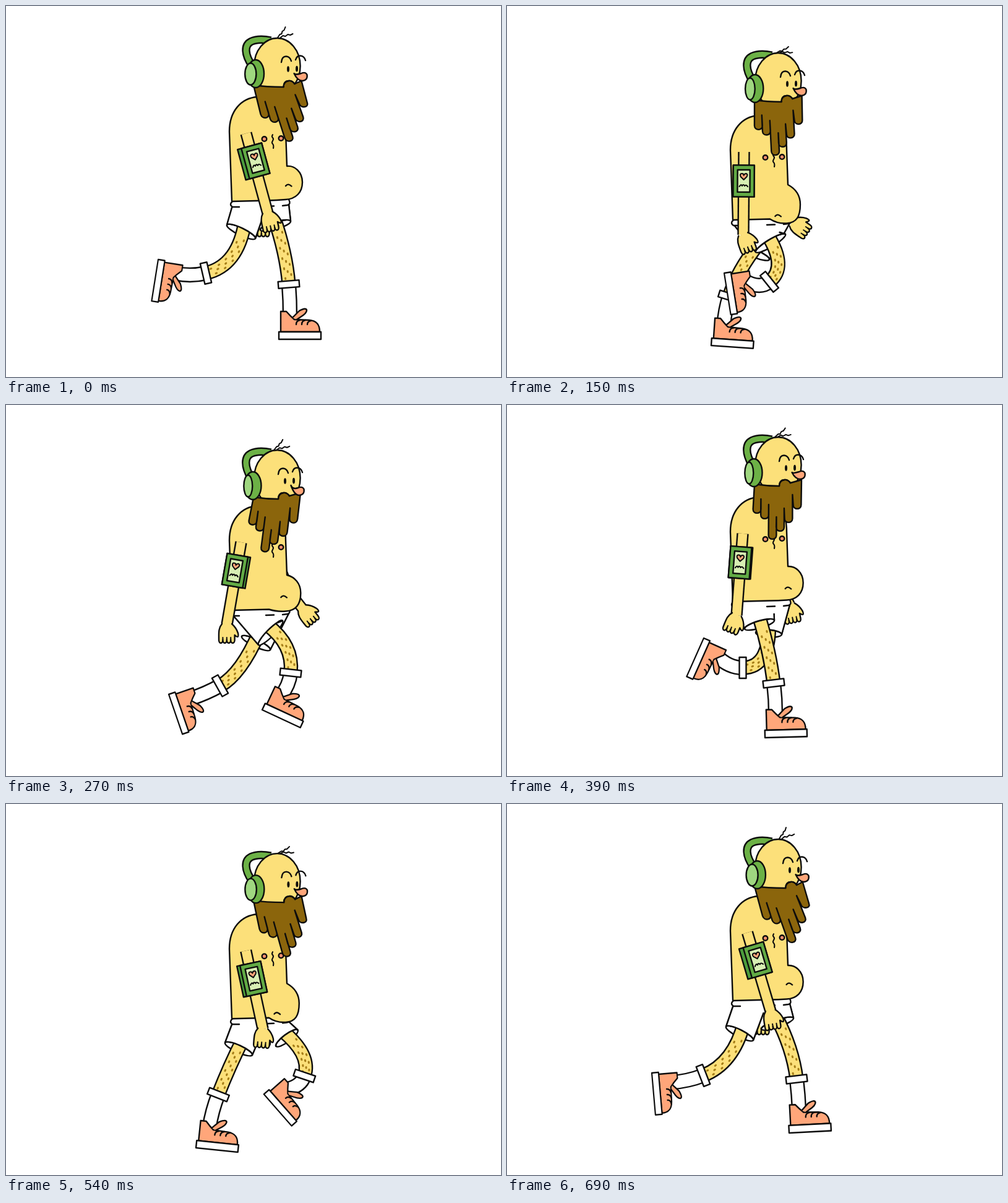
Write an HTML page with a canvas that moves like this. It is 800 px wide and 600 px high and loops after 720 ms.

```html
<!DOCTYPE html>
<html>
<head>
<meta charset="utf-8">
<title>Jogger</title>
<style>
  html, body { margin: 0; width: 100%; height: 100%; overflow: hidden; background: #fff; }
  canvas { display: block; }
</style>
</head>
<body>
<canvas id="stage" width="800" height="600"></canvas>
<script>
const ctx = document.getElementById('stage').getContext('2d');
const LOOP = 720, STEP = 30, LINE = 2.4, RAD = Math.PI / 180;
const INK = '#0c0c0c', SKIN = '#fce07a', HAIR = '#8b650c', FLESH = '#ffa67a', SPECK = '#a67e18',
      GREEN = '#6cb146', DARK = '#4c9c3c', LIGHT = '#9fd780', SCREEN = '#d8efb4';

// Rows: time, then the pose values at that time
// Legs: knee x y, cuff x y, heel x y, shoe angle, hem back x y, hem front x y
const NEAR_LEG = [
  [0, 375, 420, 323, 432, 246, 410, 99, 357, 354, 403, 376],
  [60, 390, 425, 346, 425, 282, 379, 113, 370, 362, 418, 372],
  [150, 454, 422, 424, 446, 351, 432, 81, 402, 398, 450, 369],
  [270, 465, 388, 460, 433, 414, 493, 25, 408, 388, 447, 349],
  [330, 449, 395, 452, 443, 440, 526, 3, 394, 370, 443, 343],
  [390, 425, 400, 431, 450, 417, 538, -1.5, 384, 362, 432, 348],
  [480, 381, 425, 374, 475, 350, 557, 2, 362, 385, 411, 393],
  [540, 361, 424, 343, 470, 307, 556, 6, 354, 386, 398, 406],
  [600, 342, 424, 316, 461, 263, 521, 24, 347, 380, 385, 411],
  [690, 366, 420, 317, 439, 234, 435, 85, 354, 360, 398, 382]
];
const FAR_LEG = [
  [0, 453, 400, 457, 450, 441, 539, 0, 411, 362, 460, 348],
  [150, 372, 428, 359, 470, 330, 549, 4, 380, 392, 424, 410],
  [210, 355, 422, 331, 466, 284, 542, 14, 378, 386, 422, 408],
  [270, 380, 435, 346, 454, 263, 468, 71, 381, 374, 427, 396],
  [390, 425, 425, 381, 425, 318, 377, 114, 402, 368, 444, 371],
  [480, 482, 418, 457, 437, 383, 430, 77, 426, 395, 467, 371],
  [600, 489, 395, 488, 441, 444, 504, 22, 436, 380, 471, 357],
  [645, 478, 393, 480, 443, 461, 521, 6, 424, 372, 470, 350],
  [690, 462, 395, 468, 445, 456, 532, -3, 411, 364, 463, 346]
];
// Shoulder x, wrist x y, hand angle
const NEAR_ARM = [
  [0, 388, 423, 335, -12], [150, 383, 382, 370, -20], [270, 380, 357, 355, 0], [390, 381, 371, 340, 22],
  [480, 385.5, 397, 362, 12], [600, 389, 428, 358, -2], [690, 388.5, 426, 335, -9]
];
// Wrist x y, hand angle
const FAR_ARM = [
  [0, 413, 343, 0], [150, 462, 350, -55], [270, 479, 329, -38], [390, 457, 323, -12],
  [480, 428, 352, 0], [600, 408, 362, 0], [690, 411, 343, 0]
];
// Turn of the face, beard swing, hair angle, nose drop
const HEAD = [
  [0, 5, 30, 0, 0], [150, 2, 5, 27, 0], [270, 0, -11, 4, 4], [390, 0, 0, 13, -1],
  [480, 3, 15, 28, -2], [600, 7, 34, 13, 2], [690, 6, 33, -5, 0]
];
// Once per step: torso drop, top of head, navel drop
const BOB = [
  [0, 0, 52, 0], [30, 2, 52, 4], [120, 24, 69, 18], [150, 30, 76, 19],
  [240, 23, 79, 9], [270, 16, 73, 4], [330, 2, 57, -1]
];

// Smooth cyclic interpolation through the rows
function sample(rows, time, period) {
  const n = rows.length, t = time % period;
  const time0 = i => rows[(i + n) % n][0] + period * Math.floor(i / n);
  let i = n - 1;
  while (rows[i][0] > t) i--;
  const [a, b, c, d] = [i - 1, i, i + 1, i + 2].map(time0);
  const h = c - b, u = (t - b) / h;
  return rows[i].slice(1).map((_, j) => {
    const [p, q, r, s] = [-1, 0, 1, 2].map(k => rows[(i + k + n) % n][j + 1]);
    const s0 = (q - p) / (b - a), s1 = (r - q) / h, s2 = (s - r) / (d - c);
    const m0 = (s0 * h + s1 * (b - a)) / (c - a), m1 = (s1 * (d - c) + s2 * h) / (d - b);
    return q + u * (h * m0 + u * (3 * (r - q) - h * (2 * m0 + m1) + u * (2 * (q - r) + h * (m0 + m1))));
  });
}

function draw(path, fill, line = LINE) {
  const p = new Path2D(path);
  if (fill) { ctx.fillStyle = fill; ctx.fill(p); }
  if (line) { ctx.lineWidth = line; ctx.strokeStyle = INK; ctx.stroke(p); }
}

function oval(x, y, rx, ry, fill, line = LINE, angle = 0) {
  ctx.beginPath();
  ctx.ellipse(x, y, rx, ry, angle, 0, 7);
  ctx.fillStyle = fill;
  ctx.fill();
  if (line) { ctx.lineWidth = line; ctx.strokeStyle = INK; ctx.stroke(); }
}

function tube(path, width, fill) {
  const p = new Path2D(path);
  ctx.lineCap = 'butt';
  for (const [w, color] of [[width + LINE, INK], [width - LINE, fill]]) {
    ctx.lineWidth = w;
    ctx.strokeStyle = color;
    ctx.stroke(p);
  }
  ctx.lineCap = 'round';
}

function at(x, y, degrees, paint) {
  ctx.save();
  ctx.translate(x, y);
  ctx.rotate(degrees * RAD);
  paint();
  ctx.restore();
}

function shoe() {
  draw('M3 -12V-45H12Q19 -37 25 -32L49 -31C61 -30 66 -24 66 -12Z', FLESH);
  draw('M22 -35L33 -46Q44 -52 45 -47Q45 -42 35 -36L29 -32', FLESH);
  draw('M34 -31Q28 -30 28 -24M43 -31Q37 -30 37 -24M52 -30Q46 -29 46 -24');
  draw('M0 -12H68V0H0Z', '#fff');
}

function hand() {
  const finger = 'a3.2 5 0 0 0 6.4 0';
  draw('M-8 -1C-14 6 -13 14 -13 25' + finger + finger + finger + finger +
       'V17Q20 24 18 14Q15 5 8 -1', SKIN);
  draw('M-6.6 25v-4M-.2 25v-4M6.2 25v-4', null, 2);
}

function leg(pose, hipX, drop, near) {
  const [kx, ky, cx, cy, px, py, angle, lx, ly, rx, ry] = pose;
  const mx = (lx + rx) / 2, my = (ly + ry) / 2, half = Math.hypot(rx - lx, ry - ly) / 2;
  const tilt = Math.atan2(ry - ly, rx - lx);
  const hx = mx + (hipX - mx) * .25, hy = my + (300 + drop - my) * .25;
  oval(mx, my, half, 6, '#fff', LINE, tilt);
  tube(`M${hx} ${hy}Q${kx} ${ky} ${cx} ${cy}`, 21, SKIN);

  ctx.strokeStyle = SPECK;
  ctx.lineWidth = 3;
  for (let i = 0; i < 14; i++) {
    const u = .22 + i * .052, v = 1 - u, side = [-5.5, 4.5, -.5][i % 3];
    const x = v * v * hx + 2 * u * v * kx + u * u * cx, y = v * v * hy + 2 * u * v * ky + u * u * cy;
    const dx = v * (kx - hx) + u * (cx - kx), dy = v * (ky - hy) + u * (cy - ky), d = Math.hypot(dx, dy);
    const sx = x - dy / d * side, sy = y + dx / d * side;
    ctx.beginPath();
    ctx.moveTo(sx, sy);
    ctx.lineTo(sx + dx / d * 1.6, sy + dy / d * 1.6);
    ctx.stroke();
  }

  const a = angle * RAD, squash = 1 - .1 * Math.sin(a), up = -35 * squash;
  const ax = px + 18 * Math.cos(a) - up * Math.sin(a), ay = py + 18 * Math.sin(a) + up * Math.cos(a);
  const way = Math.atan2(cy - ky, cx - kx), reach = Math.hypot(ax - cx, ay - cy) / 2;
  tube(`M${cx} ${cy}Q${cx + reach * Math.cos(way)} ${cy + reach * Math.sin(way)} ${ax} ${ay}`, 22, '#fff');
  at(cx, cy, way / RAD - 90, () => draw('M-17 -5.5H17V5.5H-17Z', '#fff'));
  at(px, py, angle, () => { ctx.scale(1, squash); shoe(); });

  // Cloth over the top of the thigh
  ctx.beginPath();
  if (near) ctx.moveTo(366, 323 + drop);
  ctx.ellipse(mx, my, half, 6, tilt, Math.PI, 2 * Math.PI);
  if (near) ctx.lineTo(417 + (rx - 403) * .5, 336 + drop);
  else ctx.lineTo(457, 321 + drop);
  const edge = [LINE, INK];
  ctx.lineWidth = edge[0];
  ctx.strokeStyle = edge[1];
  ctx.stroke();
  ctx.lineTo(near ? 440 : 400, 320 + drop);
  ctx.fillStyle = '#fff';
  ctx.fill();
  ctx.beginPath();
  if (near) ctx.moveTo(366, 323 + drop);
  ctx.ellipse(mx, my, half, 6, tilt, Math.PI, 2 * Math.PI);
  if (near) ctx.lineTo(417 + (rx - 403) * .5, 336 + drop);
  else ctx.lineTo(457, 321 + drop);
  ctx.stroke();
}

function torso(drop, navel) {
  const b = drop * .28, right = 479 - b * .6;
  ctx.save();
  ctx.translate(0, drop);
  draw('M366 316Q360 321 366 325L377 326L447 323L455 322Q461 320 457 313', '#fff', 0);
  draw('M366 316Q360 321 366 325H377M457 313Q461 320 455 322L447 323M420 324L433 323.5');
  draw(`M365 316L361 203C361 170 380 149 406 147C438 146 452 170 452 203L454 259
    C${466 + b * .1} ${257.5 + b} ${right} ${268 + b} ${right} ${285 + b * .7}
    C${right} ${302 + b} 468 ${312 + b} 452 ${313 + b}Q437 ${314 + b} 425 314.5Z`, SKIN);
  oval(417.5, 215, 3.8, 3.8, '#f98f6f');
  oval(444.5, 214, 3.8, 3.8, '#f98f6f');
  draw('M431 208q-2 3 0 5t0 5t0 5t1 7', null, 2.1);
  const nx = 457 - .38 * navel, ny = 291 + navel - drop;
  draw(`M${nx - 5} ${ny + drop * 0}q4 -5 9.5 .5`);
  ctx.restore();
}

function armband() {
  draw('M-10 -18H10V18H-10Z', SCREEN);
  draw('M0 -2L-5 -7Q-7 -12 -3 -12Q0 -12 0 -9Q1 -12 4 -12Q7 -11 5 -7Z', FLESH, 2);
  draw('M-7 9q3 -5 4.5 -1q2 -4 4 0q2 -3 5 1', null, 2.1);
}

function nearArm([sx, wx, wy, turn], drop) {
  const sy = 206 + drop, lean = -Math.atan2(wx - sx, wy - sy) / RAD;
  tube(`M${sx} ${sy}L${wx} ${wy}`, 17, SKIN);
  at(wx, wy, turn, hand);
  at(sx, sy, lean, () => {
    ctx.translate(0, 47);
    const side = lean * .42, l = -17 + Math.min(side, 0), r = 17 + Math.max(side, 0);
    ctx.translate(-side / 2, 0);
    draw(`M${l} -25.5H${r}V25.5H${l}Z`, DARK);
    draw('M-17 -25.5H17V25.5H-17Z', '#62ab45');
    armband();
  });
}

function farArm([wx, wy, turn], drop) {
  const sx = 430, sy = 195 + drop;
  tube(`M${sx} ${sy}Q${(sx + wx) / 2 - 10} ${(sy + wy) / 2 + 20} ${wx} ${wy}`, 16, SKIN);
  at(wx, wy, turn, hand);
}

function beard(face, swing) {
  const p = (x, y) => {
    const w = Math.max(0, Math.min(1, (y - 75) / 48));
    return `${x + swing * (y - 75) / 90} ${y - .006 * swing * (x - 438) * w} `;
  };
  const tips = [[404, 123], [416.5, 132], [429, 165], [441.5, 152], [455, 138], [469, 116]];
  const r = 6.4, m = 448 + 1.7 * face;
  let path = `M${m + 10} 74Q${m + 6} 68 ${m} 69Q${m - 8} 70 ${m - 8} 79Q420 79 400 76`;
  tips.forEach(([x, y], i) => {
    path += `L${p(x - r, y - r)}C${p(x - r, y + 2)}${p(x + r, y + 2)}${p(x + r, y - r)}`;
    if (tips[i + 1]) path += `L${p(x + r, Math.min(y, tips[i + 1][1]) - 23)}`;
  });
  draw(path + `L${476 + face * .3} 69Z`, HAIR);
  draw(`M${m + 10} 74Q${m + 6} 68 ${m} 69Q${m - 8} 70 ${m - 8} 79`);
}

function head([face, swing, hair, nose], top) {
  ctx.save();
  ctx.translate(0, top);
  at(433 + face * 1.1, 0, hair, () => draw('M0 0l4 -6l3 -1l1 -4l3 -2l2 -5', null, 2));
  at(437 + face * 1.1, 0, hair * .6, () => draw('M0 0l5 -4l4 1l4 -3l4 1l4 -2', null, 2));
  tube(`M${396 + face * .4} 45C385 26 385 11 396 5.5Q408 0 428 4`, 11, GREEN);
  oval(438.3, 45, 37.3, 45, SKIN);
  beard(face, swing);

  ctx.translate(face, 0);
  oval(451, 50, 2, 4.8, INK, 0);
  oval(465, 49.6, 2, 4.8, INK, 0);
  draw('M440 39Q441 29 448 29.5Q454 30 456 37M463 35Q465 28 471 28.5Q477 29 479 36');
  draw(`M460.5 57Q463 ${60 + nose} 472 ${57 + nose}Q479 ${54 + nose} 481.5 ${59 + nose}
    Q483 ${68 + nose} 474 ${69 + nose}Q466 ${69 + nose} 460.5 57Z`, FLESH);
  ctx.translate(-face, 0);

  oval(399 + face * .9, 57.5, 13.5, 22.5, GREEN);
  oval(391.3 + face * .8, 58, 7 + face * .42, 17.5, LIGHT);
  ctx.restore();
}

function frame(now) {
  const t = Math.floor(now / STEP) * STEP % LOOP;
  const [drop, top, navel] = sample(BOB, t, LOOP / 2);
  ctx.fillStyle = '#fff';
  ctx.fillRect(0, 0, 800, 600);
  ctx.lineJoin = ctx.lineCap = 'round';
  farArm(sample(FAR_ARM, t, LOOP), drop);
  leg(sample(FAR_LEG, t, LOOP), 425, drop, false);
  leg(sample(NEAR_LEG, t, LOOP), 405, drop, true);
  torso(drop, navel + drop);
  nearArm(sample(NEAR_ARM, t, LOOP), drop);
  head(sample(HEAD, t, LOOP), top);
  requestAnimationFrame(frame);
}
requestAnimationFrame(frame);
</script>
</body>
</html>
```
